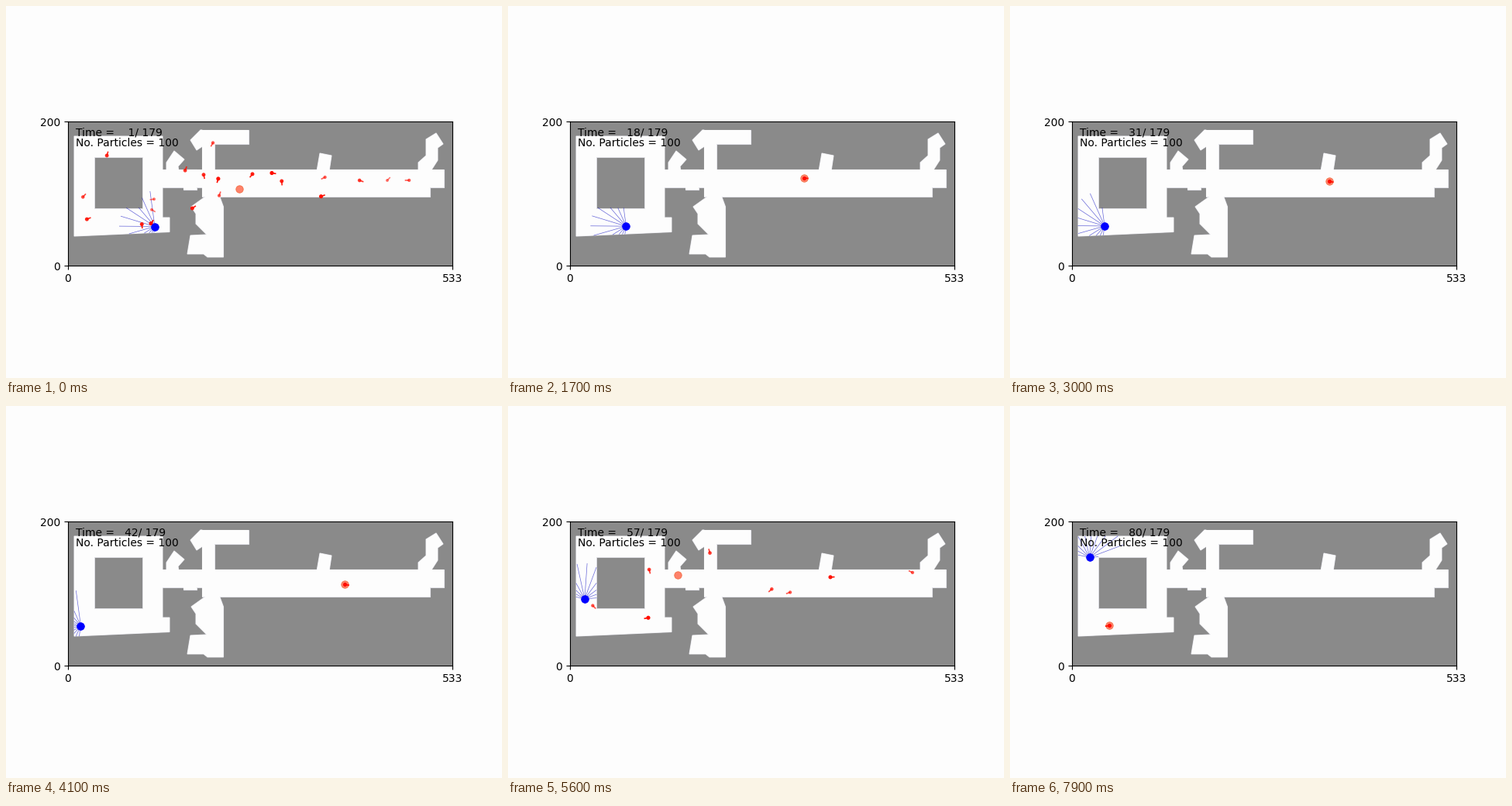
A matplotlib script for the animation above (8000 ms loop, 640 px wide and 480 px high).

```python
import numpy as np
import matplotlib.pyplot as plt
from matplotlib.animation import FuncAnimation
from matplotlib.collections import LineCollection
from matplotlib.path import Path

FRAMES, STEPS = 80, 179
TURN, RESET = 41, 48          # robot turns right; filter is spread out again
TURN_ANGLE = -93.5
SPEED, RANGE = 2.33, 46.5     # pixels per step, sensor reach in pixels
WALL, EDGE, FLOOR, PAPER = "#8a8a8a", "#e4e4ea", "#fdfdfd", "#fdfdfd"


def rect(x0, y0, x1, y1):
    return [(x0, y0), (x1, y0), (x1, y1), (x0, y1)]


# Floor plan in stage pixels
ROOMS = [
    [(88, 168), (202, 168), (202, 273), (211, 273), (211, 291.5), (88, 297)],
    rect(200, 211, 565, 234),
    rect(253, 211, 547, 246),
    rect(229, 211, 246, 237),
    rect(253, 176, 269, 213),
    rect(251, 160, 313, 178),
    [(253, 160), (251, 160), (238, 173), (246, 186), (255, 180)],
    [(207, 213), (207, 202), (217, 187), (230, 198), (222, 207), (223, 213)],
    [(260, 244), (239, 259), (245, 268), (245, 281), (259, 295), (238, 296),
     (234, 320), (255, 320), (260, 324), (280.5, 324), (280.5, 259), (275, 244)],
    [(401, 213), (405, 190), (420, 193), (417, 213)],
    [(532, 213), (532, 202), (542, 193), (542, 172), (555, 164), (564, 178),
     (557, 183), (557, 199), (548, 213)],
]
BLOCK = rect(114, 194.5, 175.5, 260.5)
ROOM_PATHS = [Path(r + r[:1]) for r in ROOMS]
BLOCK_PATH = Path(BLOCK + BLOCK[:1])


def is_free(pts):
    inside = np.any([p.contains_points(pts) for p in ROOM_PATHS], axis=0)
    return inside & ~BLOCK_PATH.contains_points(pts)


def direction(deg):
    a = np.radians(deg)
    return np.array([np.cos(a), -np.sin(a)])


def walk(f, start, x, y, heading):
    """Position and heading at step f: straight on, with one turn at TURN."""
    before = max(0, min(f, TURN) - start)
    after = f - start - before
    pos = np.array([x, y]) + SPEED * before * direction(heading)
    if start < TURN < f:
        heading += TURN_ANGLE
    return pos + SPEED * after * direction(heading), heading


class Cloud:
    """Random particles that die out until only the leader is left."""

    def __init__(self, start, leader, offset, span, count, life, seed):
        self.start, self.leader, self.span = start, leader, span
        self.offset = np.array(offset)
        rng = np.random.default_rng(seed)
        pts = rng.uniform((90, 162), (563, 322), (600, 2))
        pts = pts[is_free(pts)][:count]
        self.poses = [(x, y, rng.uniform(0, 360)) for x, y in pts]
        self.lives = np.minimum(rng.exponential(life, count), span)
        self.alphas = rng.uniform(.55, 1, count)

    def at(self, f):
        """Estimate, poses and opacities at step f; the leader comes last."""
        age = f - self.start
        poses, alphas = [], []
        for pose, life, alpha in zip(self.poses, self.lives, self.alphas):
            pos, heading = walk(f, self.start, *pose)
            if age <= life and is_free([pos])[0]:
                poses.append((pos, heading))
                alphas.append(alpha)
        lead = walk(f, self.start, *self.leader)
        fade = 1 - min(age / self.span, 1) ** 3
        return lead[0] + self.offset * fade, poses + [lead], alphas + [1]


ROBOT = (192, 284.5, 179.5)
CLOUDS = [
    Cloud(0, (343, 215.5, -9), (-42, 20.5), 14, count=20, life=5, seed=3),
    Cloud(RESET, (199.3, 269.8, 190.7), (41.5, -61), 18, count=30, life=6, seed=8),
]


def scan(pos, heading):
    reach = np.arange(0, RANGE, .5)
    rays = []
    for k in range(-5, 6):
        pts = pos + reach[:, None] * direction(heading + k * 180 / 11)
        hit = ~is_free(pts)
        end = hit.argmax() if hit.any() else len(pts) - 1
        rays.append([pos, pts[end]])
    return rays


fig = plt.figure(figsize=(6.4, 4.8), dpi=100, facecolor=PAPER)
grid = fig.add_subplot(facecolor=WALL)
grid.set(xlim=(0, 533), ylim=(0, 200), xticks=[0, 533], yticks=[0, 200],
         aspect="equal")

ax = fig.add_axes([0, 0, 1, 1])
ax.set(xlim=(0, 640), ylim=(480, 0))
ax.axis("off")
for room in ROOMS:
    ax.add_patch(plt.Polygon(room, fc=EDGE, ec=EDGE, lw=.8, zorder=1))
    ax.add_patch(plt.Polygon(room, fc=FLOOR, ec="none", zorder=1.1))
ax.add_patch(plt.Polygon(BLOCK, fc=WALL, ec=EDGE, lw=.6, zorder=1.2))

rays = ax.add_collection(LineCollection([], colors="#0000c0", lw=.5, alpha=.6, zorder=2))
mean, = ax.plot([], [], "o", ms=6.8, mfc="tomato", mec="#f06030", mew=.6,
                alpha=.8, zorder=2.1)
tails = ax.add_collection(LineCollection([], lw=1.2, zorder=2.2))
dots = ax.scatter([], [], s=12, linewidths=0, zorder=2.3)
robot, = ax.plot([], [], "o", ms=7, color="blue", mew=.5, zorder=2.4)
clock = ax.text(90.3, 167.9, "", zorder=3)
ax.text(90.3, 180.9, "No. Particles = 100", zorder=3)


def draw(f):
    here, heading = walk(f, 0, *ROBOT)
    robot.set_data([here[0]], [here[1]])
    rays.set_segments(scan(here, heading))

    center, poses, alphas = CLOUDS[f >= RESET].at(f)
    mean.set_data([center[0]], [center[1]])
    colors = [(1, .05, 0, a) for a in alphas]
    tails.set_segments([[p, p + 5.5 * direction(d)] for p, d in poses])
    tails.set_color(colors)
    dots.set_offsets([p for p, _ in poses])
    dots.set_facecolor(colors)
    dots.set_sizes(14 * np.array(alphas))

    clock.set_text(f"Time = {f + 1:4d}/{STEPS:4d}")
    return rays, mean, tails, dots, robot, clock


anim = FuncAnimation(fig, draw, frames=FRAMES, interval=100, repeat=True,
                     repeat_delay=0)
plt.show()
```
